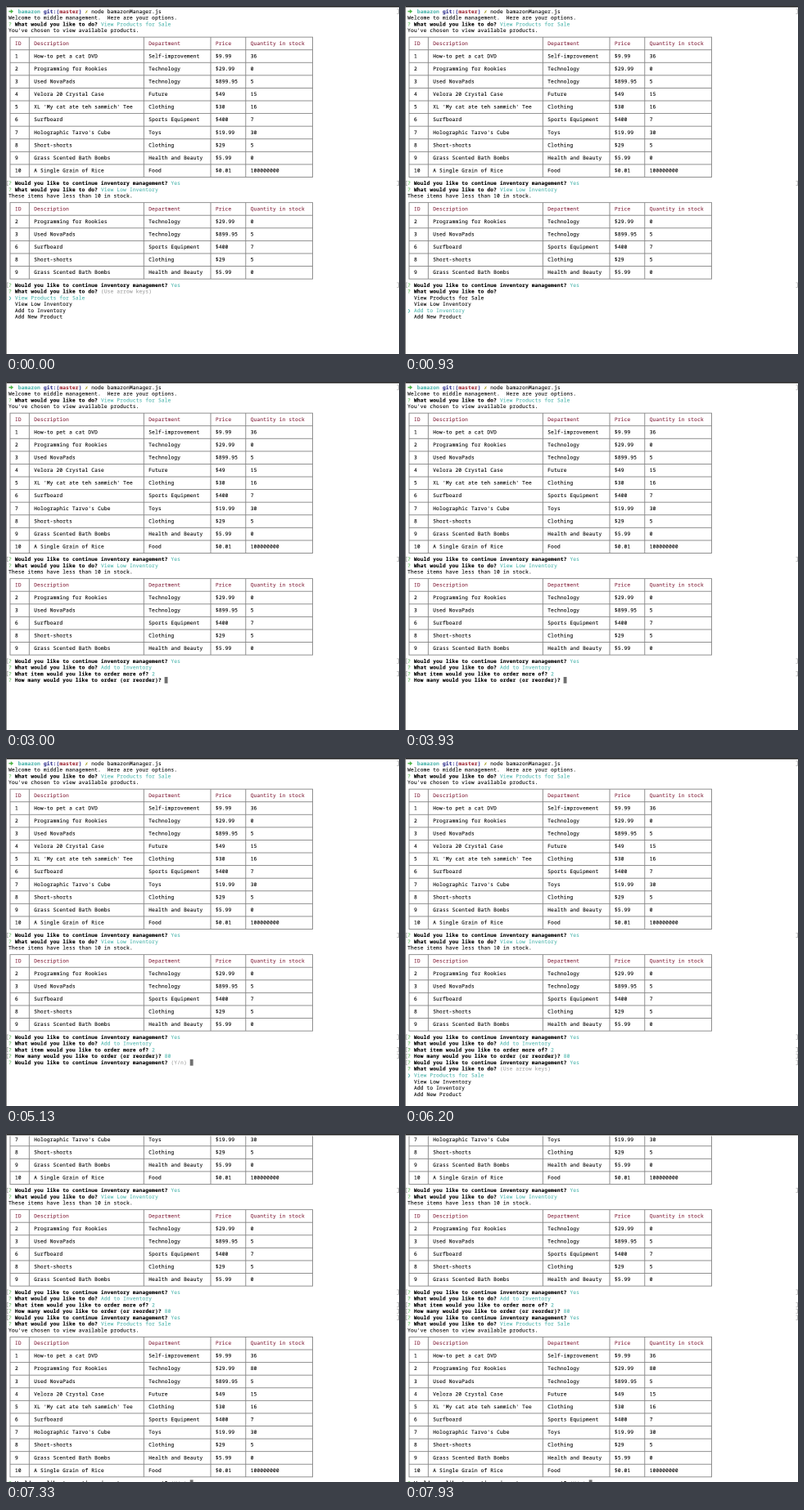
An HTML page with a canvas that plays this animation: 480 by 426 pixels, repeating every 8000 ms.

```html
<!DOCTYPE html>
<html lang="en">
<head>
<meta charset="utf-8">
<title>Inventory terminal</title>
<style>
  html, body { margin: 0; width: 100%; height: 100%; overflow: hidden; background: #fff; }
  canvas { display: block; width: 480px; height: 426px; }
</style>
</head>
<body>
<canvas id="stage" width="960" height="852"></canvas>
<script>
const ctx = document.getElementById('stage').getContext('2d');
const LOOP = 8000, W = 480, H = 426;
const LEFT = 3.06, CELL = 3.889, TOP = 6.6, LINE = 7.79;
const FONT = '6.11px "Noto Sans Mono", "DejaVu Sans Mono", monospace';
const C = {
  ink: '#000', cyan: '#4fb5ad', green: '#4fb548', head: '#85263f', rule: '#858585',
  hint: '#a0a0a0', blue: '#2f2f8c', red: '#a02c38', gold: '#a8a024', cursor: '#707070', mark: '#9a9a9a'
};

const COLS = [0, 6, 42, 63, 74, 95];
const HEAD = ['ID', 'Description', 'Department', 'Price', 'Quantity in stock'];
const ITEMS = [
  ['How-to pet a cat DVD', 'Self-improvement', '$9.99', '36'],
  ['Programming for Rookies', 'Technology', '$29.99', '0'],
  ['Used NovaPads', 'Technology', '$899.95', '5'],
  ['Velora 20 Crystal Case', 'Future', '$49', '15'],
  ["XL 'My cat ate teh sammich' Tee", 'Clothing', '$30', '16'],
  ['Surfboard', 'Sports Equipment', '$400', '7'],
  ["Holographic Tarvo's Cube", 'Toys', '$19.99', '30'],
  ['Short-shorts', 'Clothing', '$29', '5'],
  ['Grass Scented Bath Bombs', 'Health and Beauty', '$5.99', '0'],
  ['A Single Grain of Rice', 'Food', '$0.01', '100000000']
].map((item, i) => [String(i + 1), ...item]);
const LOW = ITEMS.filter(item => +item[4] < 10);
const RESTOCKED = ITEMS.map(item => item[0] === '2' ? [...item.slice(0, 4), '80'] : item);

const MENU = ['View Products for Sale', 'View Low Inventory', 'Add to Inventory', 'Add New Product'];
const TODO = 'What would you like to do?';
const MORE = 'Would you like to continue inventory management?';
const WHICH = 'What item would you like to order more of?';
const COUNT = 'How many would you like to order (or reorder)?';
const CHOSEN = "You've chosen to view available products.";

let scroll = 0;
const colX = col => LEFT + col * CELL;
const rowY = row => TOP + (row - scroll) * LINE;

function print(row, col, text, color = C.ink, bold = false) {
  ctx.font = (bold ? 'bold ' : '500 ') + FONT;
  ctx.textAlign = 'center';
  ctx.fillStyle = ctx.strokeStyle = color;
  ctx.lineWidth = 0.12;
  [...text].forEach((ch, i) => {
    if (ch === ' ') return;
    const x = colX(col + i + 0.5), y = rowY(row) + 2.2;
    ctx.fillText(ch, x, y);
    ctx.strokeText(ch, x, y);
  });
}

function arrow(row) {
  const x = colX(0), y = rowY(row);
  ctx.fillStyle = C.green;
  ctx.fillRect(x + 0.4, y - 0.8, 3.2, 1.6);
  ctx.beginPath();
  ctx.moveTo(x + 2.8, y - 2.6);
  ctx.lineTo(x + 6, y);
  ctx.lineTo(x + 2.8, y + 2.6);
  ctx.fill();
}

function cursor(row, col) {
  ctx.fillStyle = C.cursor;
  ctx.fillRect(colX(col), rowY(row) - LINE / 2, CELL, LINE);
}

function bracket(row, stem, bar) {
  const y = rowY(row) - 3;
  ctx.fillStyle = C.mark;
  ctx.fillRect(stem, y, 0.6, 6);
  ctx.fillRect(bar, y, 2, 0.6);
  ctx.fillRect(bar, y + 5.4, 2, 0.6);
}

function mark(row) {
  bracket(row, 1, 1);
  bracket(row, 479, 477.5);
}

// Prints a question and returns the column after its answer.
function ask(row, question, answer = '', color = C.cyan) {
  print(row, 0, '?', C.green);
  print(row, 2, question, C.ink, true);
  const col = question.length + 3;
  print(row, col, answer, color);
  return col + answer.length;
}

function table(row, items) {
  const lines = 2 * items.length + 2;
  const mid = col => colX(col + 0.5);
  const right = COLS[COLS.length - 1];
  const top = rowY(row) + 0.35;
  ctx.fillStyle = C.rule;
  for (let i = 0; i <= lines; i += 2) {
    ctx.fillRect(mid(0) - 0.45, top + i * LINE - 0.45, mid(right) - mid(0) + 0.9, 0.9);
  }
  for (const col of COLS) {
    ctx.fillRect(mid(col) - 0.45, top, 0.9, lines * LINE);
  }
  HEAD.forEach((text, i) => print(row + 1, COLS[i] + 2, text, C.head));
  items.forEach((item, r) =>
    item.forEach((text, i) => print(row + 3 + 2 * r, COLS[i] + 2, text)));
}

function menu(row, picked, hint) {
  ask(row, TODO, hint ? '(Use arrow keys)' : '', C.hint);
  MENU.forEach((text, i) => {
    const on = i === picked;
    if (on) print(row + 1 + i, 0, '❯', C.cyan);
    print(row + 1 + i, 2, text, on ? C.cyan : C.ink);
  });
}

function history() {
  bracket(0, 479, 477.5);
  arrow(0);
  print(0, 3, 'bamazon', C.cyan, true);
  print(0, 11, 'git:(', C.blue, true);
  print(0, 16, 'master', C.red, true);
  print(0, 22, ')', C.blue, true);
  print(0, 24, '✗', C.gold, true);
  print(0, 26, 'node bamazonManager.js');
  print(1, 0, 'Welcome to middle management.  Here are your options.');
  ask(2, TODO, MENU[0]);
  print(3, 0, CHOSEN);
  table(4, ITEMS);
  mark(27);
  ask(27, MORE, 'Yes');
  ask(28, TODO, MENU[1]);
  print(29, 0, 'These items have less than 10 in stock.');
  table(30, LOW);
  mark(43);
  ask(43, MORE, 'Yes');
}

function session(t) {
  if (t < 1600) return menu(44, t < 330 ? 0 : t < 800 ? 1 : 2, t < 330);
  ask(44, TODO, MENU[2]);

  if (t < 2000) return cursor(45, 0);
  if (t < 3000) return cursor(45, ask(45, WHICH, t < 2470 ? '' : '2', C.ink));
  mark(45);
  ask(45, WHICH, '2');

  if (t < 5070) {
    const typed = t < 4130 ? '' : t < 4400 ? '8' : '80';
    return cursor(46, ask(46, COUNT, typed, C.ink));
  }
  mark(46);
  ask(46, COUNT, '80');

  if (t < 5130) return cursor(47, 0);
  if (t < 5930) return cursor(47, ask(47, MORE, '(Y/n) ', C.hint));
  mark(47);
  ask(47, MORE, 'Yes');

  if (t < 6000) return cursor(48, 0);
  if (t < 7270) return menu(48, 0, true);
  ask(48, TODO, MENU[0]);

  if (t < 7330) return cursor(49, 0);
  print(49, 0, CHOSEN);
  table(50, RESTOCKED);
  cursor(73, ask(73, MORE, '(Y/n) ', C.hint));
}

function draw(t) {
  ctx.setTransform(2, 0, 0, 2, 0, 0);
  ctx.fillStyle = '#fff';
  ctx.fillRect(0, 0, W, H);
  ctx.fillStyle = '#222';
  ctx.fillRect(0, 0, W, 1.5);
  ctx.fillStyle = '#666';
  ctx.fillRect(0, 0, 0.8, H);
  scroll = t < 7330 ? 0 : 19;
  ctx.save();
  ctx.beginPath();
  ctx.rect(0.8, 2.5, W, H);
  ctx.clip();
  history();
  session(t);
  ctx.restore();
}

const start = performance.now();
function tick() {
  draw((performance.now() - start) % LOOP);
  requestAnimationFrame(tick);
}
tick();
</script>
</body>
</html>
```
